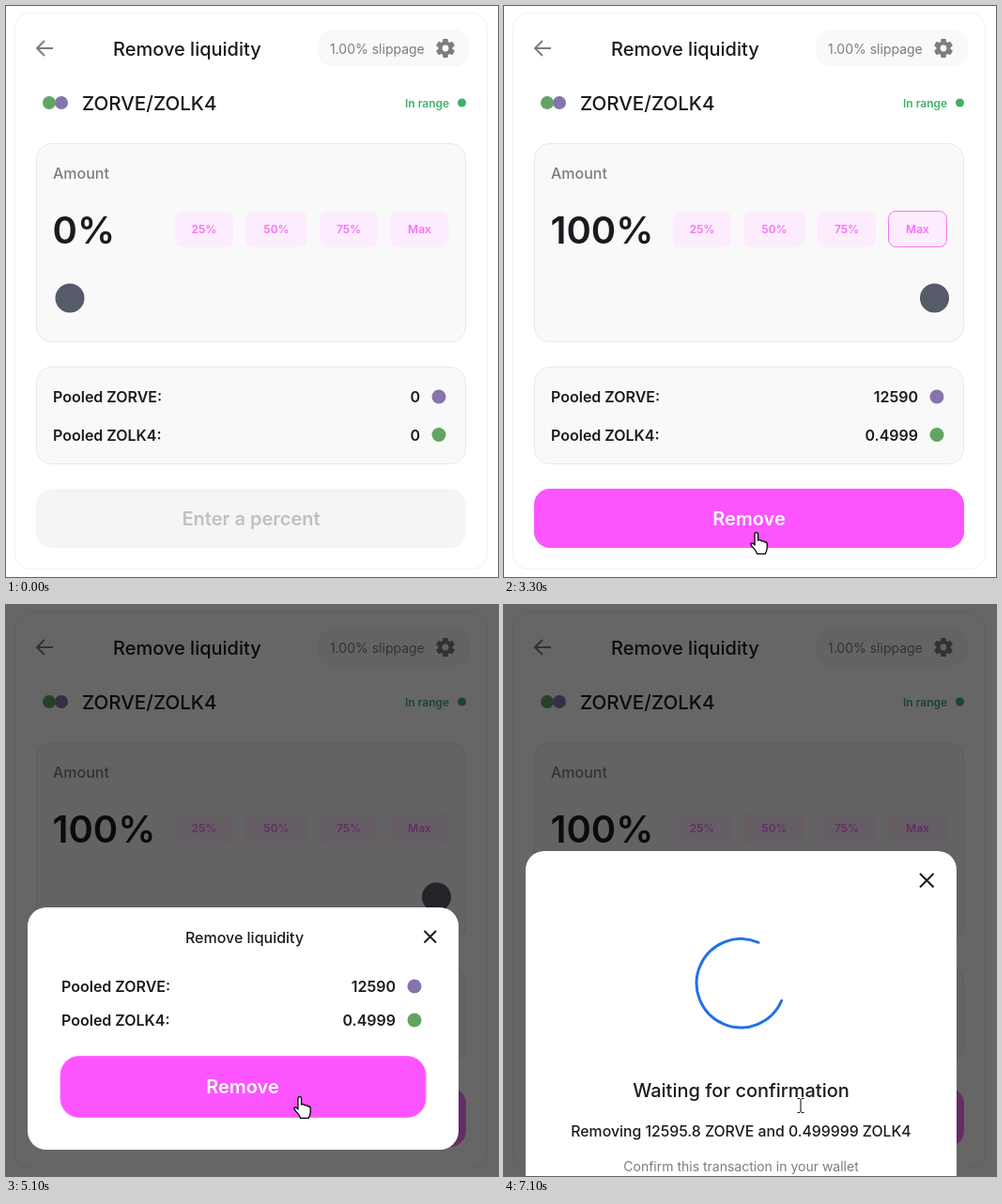
Animation of 524 by 608 pixels, one loop 7.2 s. Source, as an HTML page:

```html
<!DOCTYPE html>
<html lang="en">
<head>
<meta charset="utf-8">
<title>Remove liquidity</title>
<style>
  html, body { margin: 0; width: 100%; height: 100%; overflow: hidden; background: #fff; }
  svg { display: block; width: 100%; height: 100%; }
  text { font-family: Inter, Roboto, sans-serif; fill: #191b1f; }
  .mid { text-anchor: middle; }
  .end { text-anchor: end; }
  .title { font-size: 20px; font-weight: 500; }
  .row { font-size: 16px; font-weight: 600; }
  .cta { font-size: 20px; font-weight: 600; fill: #fff; text-anchor: middle; }
  .note { font-size: 14px; fill: #7d7d7d; }
  .quick { font-size: 12px; font-weight: 600; fill: #fa70fa; text-anchor: middle; }
  .card { fill: #f9f9f9; stroke: #e8e8e8; }
  .line { fill: none; stroke: #191b1f; stroke-width: 2; }
  .violet { fill: #8674ad; }
  .green { fill: #63a463; }
  .glyph { fill: #fff; stroke: #000; stroke-width: 1.3; stroke-linejoin: round; }
</style>
</head>
<body>
<svg viewBox="0 0 524 608">
  <rect width="524" height="608" fill="#fff"/>
  <rect x="9.5" y="7.5" width="503" height="592" rx="16" fill="#fff" stroke="#f0f0f0"/>

  <path class="line" style="stroke:#7d7d7d" d="M50 45H33M41 37L33 45L41 53"/>
  <text class="title" x="114" y="53">Remove liquidity</text>
  <rect x="332" y="25" width="162" height="40" rx="16" fill="#f9f9f9"/>
  <text class="note" x="345" y="51">1.00% slippage</text>
  <g id="gear" transform="translate(468 45)" fill="#7d7d7d">
    <circle r="7.6"/>
  </g>

  <circle class="green" cx="46" cy="103" r="7"/>
  <circle class="violet" cx="59" cy="103" r="7"/>
  <text x="81" y="111" style="font-size:20.6px;font-weight:500">ZORVE/ZOLK4</text>
  <text x="425" y="108" style="font-size:12px;font-weight:600;fill:#40b06a">In range</text>
  <circle cx="485.5" cy="103" r="4.5" fill="#40b06a"/>

  <rect class="card" x="32.5" y="146.5" width="457" height="211" rx="16"/>
  <text x="50" y="184" style="font-size:16px;font-weight:500;fill:#7d7d7d">Amount</text>
  <text id="percent" x="49.5" y="253" style="font-size:40px;font-weight:600"></text>
  <g id="quicks"></g>
  <circle id="thumb" cy="311" r="15.5" fill="#565a69"/>

  <rect class="card" x="32.5" y="384.5" width="457" height="103" rx="16"/>
  <text class="row" x="50" y="422">Pooled ZORVE:</text>
  <text class="row" x="50" y="463">Pooled ZOLK4:</text>
  <text class="row end" id="poolA" x="441" y="422"></text>
  <text class="row end" id="poolB" x="441" y="463"></text>
  <circle class="violet" cx="461" cy="416" r="7.5"/>
  <circle class="green" cx="461" cy="456.5" r="7.5"/>

  <rect id="main" x="32" y="514" width="458" height="63" rx="17"/>
  <text class="cta" id="mainText" x="261" y="553"></text>

  <path id="scrim" fill-rule="evenodd"/>

  <g id="review">
    <rect x="23" y="322" width="459" height="258" rx="20" fill="#fff"/>
    <text class="mid" x="254" y="360" style="font-size:16px;font-weight:500">Remove liquidity</text>
    <path class="line" d="M445.5 347l12.5 12.5m0-12.5l-12.5 12.5"/>
    <text class="row" x="59" y="412">Pooled ZORVE:</text>
    <text class="row" x="59" y="448">Pooled ZOLK4:</text>
    <text class="row end" x="415" y="412">12590</text>
    <text class="row end" x="415" y="448">0.4999</text>
    <circle class="violet" cx="435" cy="406" r="7.5"/>
    <circle class="green" cx="435" cy="442" r="7.5"/>
    <rect x="58" y="480.5" width="389" height="65" rx="20" fill="#fc54ff" stroke="#fc72ff"/>
    <text class="cta" x="252" y="520">Remove</text>
  </g>

  <g id="wait">
    <rect x="23" y="262" width="459" height="400" rx="20" fill="#fff"/>
    <path class="line" d="M443 286l14.5 14.5m0-14.5l-14.5 14.5"/>
    <path id="spinner" d="M47.2 0A47.2 47.2 0 1 1 0 -47.2" fill="none" stroke="#2172e5" stroke-width="3" stroke-linecap="round"/>
    <text class="title mid" x="252.5" y="524">Waiting for confirmation</text>
    <text class="mid" x="252.5" y="566" style="font-size:15.8px;font-weight:500">Removing 12595.8 ZORVE and 0.499999 ZOLK4</text>
    <text class="note mid" x="252.5" y="603">Confirm this transaction in your wallet</text>
  </g>

  <g id="cursor">
    <path id="arrow" class="glyph" d="M.6 .8V17l3.7-3.4 2.7 6 2.5-1-2.7-5.9h5Z"/>
    <path id="hand" class="glyph" d="M5 14V2.5a1.8 1.8 0 0 1 3.6 0V9q3-1 3.6.8 2.6-.8 3.2 1 2.8-.3 2.8 2V17q0 3-2 6.4H7.5q-.5-3-5-7.5Q-.5 12 2 11.8q1.5 0 3 2.2Z"/>
    <path id="beam" fill="none" stroke="#000" d="M6.5 2.5h2.5l1 1 1-1h2.5M10 3.5v13M6.5 17.5h2.5l1-1 1 1h2.5"/>
  </g>
</svg>
<script>
const LOOP = 7200, CLICK_MAX = 1700, POOLED = 1800, BLUR = 3700, OPEN = 3882, FADE = 200, SENT = 5500;
const $ = id => document.getElementById(id);
const set = (id, attrs) => { for (const k in attrs) $(id).setAttribute(k, attrs[k]); };
const show = (id, on) => set(id, { visibility: on ? 'visible' : 'hidden' });
const clamp = v => Math.min(1, Math.max(0, v));

// time, x, y
const route = [
  [1200, 501, 444], [1500, 451, 235], [2200, 451, 235], [2950, 264, 553], [3300, 262, 560],
  [4420, 262, 560], [4760, 394, 545], [5100, 306, 523]
];

$('gear').innerHTML += [0, 60, 120].map(a =>
  `<rect x="-2.8" y="-10" width="5.6" height="20" rx="1" transform="rotate(${a})"/>`).join('') +
  '<circle r="3.4" fill="#f9f9f9"/>';

$('quicks').innerHTML = [['25%', 180, 62], ['50%', 255, 66], ['75%', 334, 62], ['Max', 409.5, 62]].map(([label, x, w]) =>
  `<rect id="q${parseInt(label) || 'Max'}" x="${x}" y="218.5" width="${w}" height="38" rx="8" fill="#fdecfd"/>` +
  `<text class="quick" x="${x + w / 2}" y="242">${label}</text>`).join('');

function position(t) {
  let i = 0;
  while (i < route.length - 2 && t >= route[i + 1][0]) i++;
  const [t0, x0, y0] = route[i], [t1, x1, y1] = route[i + 1];
  const p = clamp((t - t0) / (t1 - t0)), e = p * p * (3 - 2 * p);
  return [x0 + (x1 - x0) * e, y0 + (y1 - y0) * e];
}

function draw(t) {
  const [x, y] = position(t);
  const open = t >= OPEN, sent = t >= SENT, max = t >= CLICK_MAX, ready = t >= POOLED;
  const onMax = x > 403 && x < 468 && y > 218 && y < 257;
  const onMain = !open && y > 514;
  const onConfirm = open && y < 545;
  const hand = !sent && (onMax || onMain || onConfirm);

  $('percent').textContent = max ? '100%' : '0%';
  set('thumb', { cx: max ? 458.5 : 68 });
  set('qMax', { stroke: t >= 1500 && t < BLUR ? '#f774f7' : 'none' });
  $('poolA').textContent = ready ? '12590' : '0';
  $('poolB').textContent = ready ? '0.4999' : '0';
  set('main', { fill: !ready ? '#f5f5f5' : onMain ? '#fc54ff' : '#fc72ff' });
  $('mainText').textContent = ready ? 'Remove' : 'Enter a percent';
  $('mainText').style.fill = ready ? '#fff' : '#c0c0c0';

  // the dialog area stays bright until the dialog is opaque
  const a = clamp((t - OPEN) / FADE);
  const hole = a < 1 ? 'M43 322H462q20 0 20 20V560q0 20-20 20H43q-20 0-20-20V342q0-20 20-20Z' : '';
  set('scrim', { d: 'M0 0H524V608H0Z' + hole, opacity: 0.6 * a });
  show('review', open && !sent);
  set('review', { opacity: a });
  show('wait', sent);
  set('spinner', { transform: `translate(252.3 402.7) rotate(${203 + 0.18 * (t - 6100)})` });

  set('cursor', { transform: `translate(${x} ${y})` });
  const here = t >= route[0][0];
  show('arrow', here && !hand && !sent);
  show('hand', here && hand);
  show('beam', sent);
}

const start = performance.now();
function tick(now) {
  draw(Math.max(0, now - start) % LOOP);
  requestAnimationFrame(tick);
}
draw(0);
requestAnimationFrame(tick);
</script>
</body>
</html>
```
